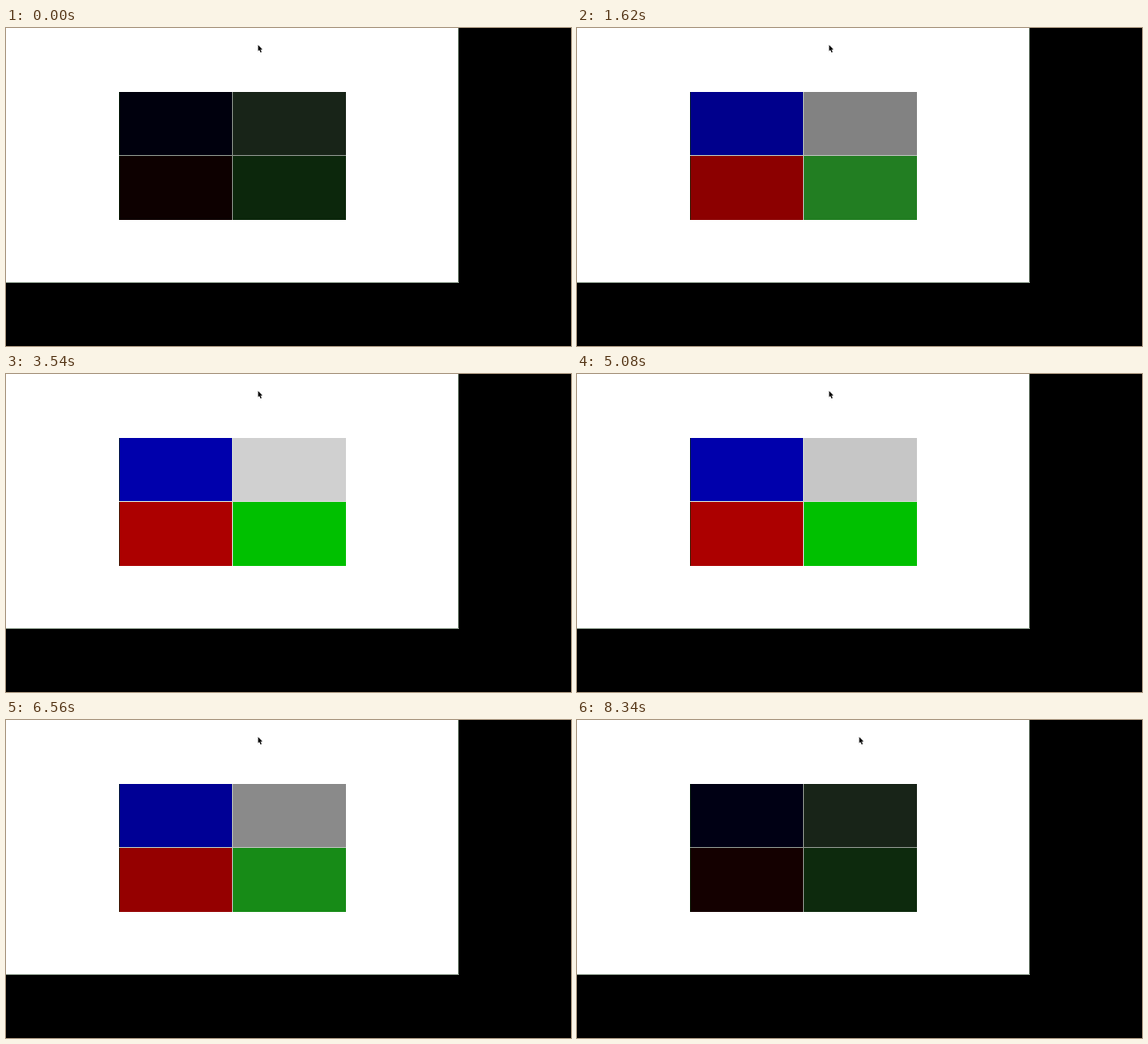
Write an HTML page with a canvas that moves like this. It is 600 px wide and 338 px high and loops after 8.36 s.

```html
<!DOCTYPE html>
<html lang="en">
<head>
<meta charset="utf-8">
<title>Four fading panels</title>
<style>
  html, body { margin: 0; width: 100%; height: 100%; overflow: hidden; background: #000; }
  canvas { display: block; }
</style>
</head>
<body>
<canvas id="stage" width="600" height="338"></canvas>
<script>
const ctx = document.getElementById('stage').getContext('2d');
const LOOP = 8360;
const STEP = 20;
const GLIDE = 200;   // cursor moves at the end of the loop
const pointer = new Path2D('M0 0V6.6L1.5 5.3L2.6 8L3.8 7.5L2.7 4.9H4.7Z');

const rgb = (r, g, b) => `rgb(${[r, g, b].map(Math.round)})`;

function box(color, x, y, w, h) {
  ctx.fillStyle = color;
  ctx.fillRect(x, y, w, h);
}

// Brightness rises quickly, then slowly, and falls the same way.
function brightness(t) {
  const x = 1 - Math.abs(2 * t / LOOP - 1);
  return 12 + 218 * x ** 0.65;
}

function panels(v) {
  const pure = Math.min(172, v * 1.08);
  const green = Math.min(192, Math.max(35 + v * 0.37, v * 1.6 - 82));
  const tint = Math.max(0, Math.min(green / 3.2, (168 - green) * 0.8));
  const grey = Math.max(v, 24);

  box(rgb(0, 0, pure), 120, 68, 120, 68);
  box(rgb(grey, Math.max(v, 36), grey), 240, 68, 121, 68);
  box(rgb(pure, 0, 0), 120, 136, 120, 68);
  box(rgb(tint, green, tint), 240, 136, 121, 68);

  const light = 130 + v * 0.4;
  const seam = rgb(light, light + 8, light);
  box('rgba(8,40,8,.6)', 120, 68, 1, 136);
  box(seam, 240, 68, 1, 136);
  box(seam, 120, 135, 241, 1);
}

function cursor(x, y) {
  ctx.save();
  ctx.translate(x, y);
  ctx.fillStyle = '#000';
  ctx.fill(pointer);
  ctx.restore();
}

function draw(t) {
  box('#000', 0, 0, 600, 338);
  box('#fff', 0, 0, 480, 270);
  box(rgb(150, 165, 150), 0, 270, 481, 1);
  box(rgb(100, 115, 100), 480, 0, 1, 270);
  panels(brightness(t));

  const k = Math.max(0, (t - LOOP + GLIDE) / (GLIDE - STEP));
  cursor(267.7 + 32 * k, 17.9);
}

function frame(now) {
  draw(Math.floor(now % LOOP / STEP) * STEP);
  requestAnimationFrame(frame);
}
draw(0);
requestAnimationFrame(frame);
</script>
</body>
</html>
```
